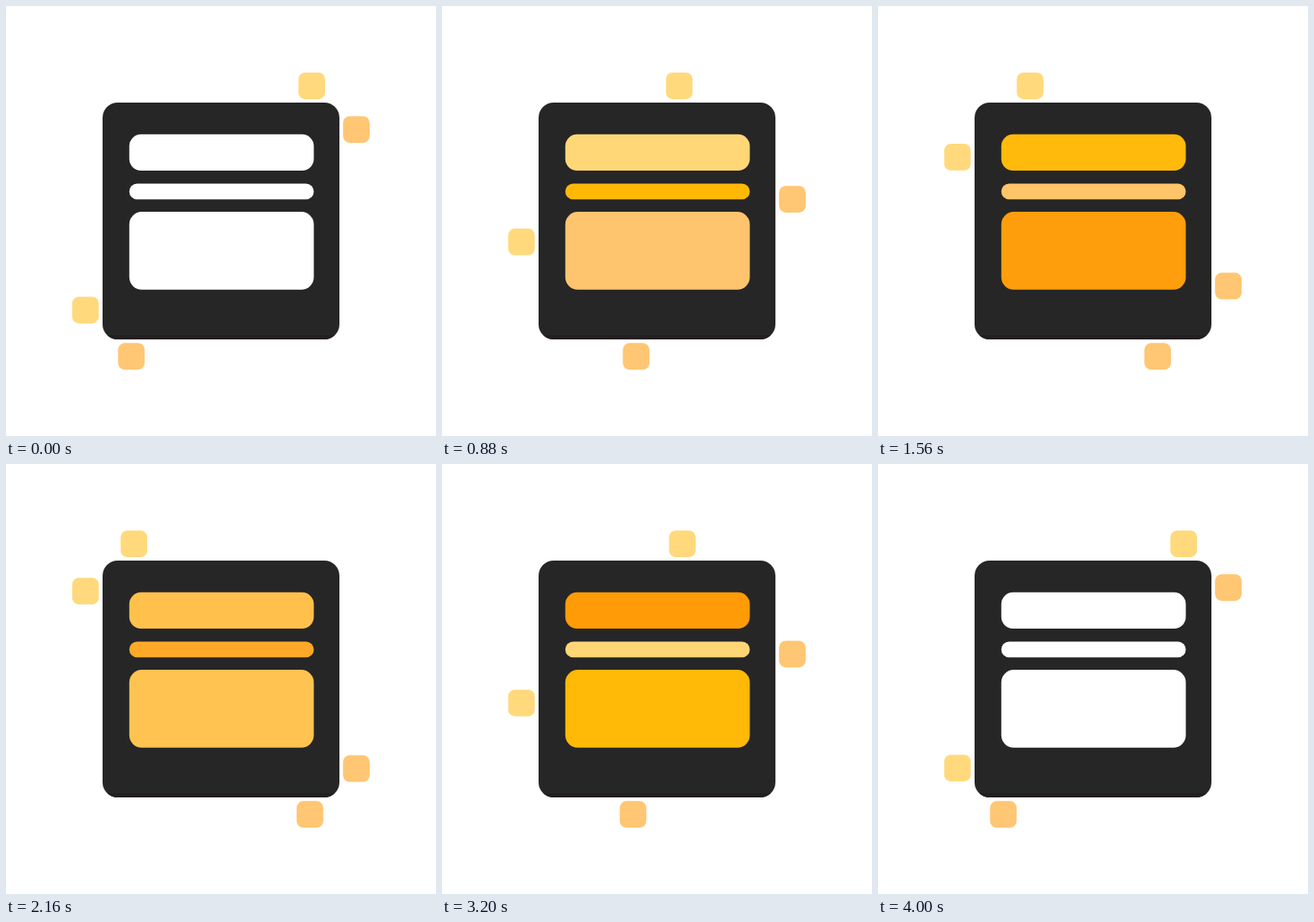
An HTML page that plays this animation: 512 by 512 pixels, repeating every 4.04 s.

```html
<!DOCTYPE html>
<html lang="en">
<head>
<meta charset="utf-8">
<title>Card loader</title>
<style>
  html, body { margin: 0; width: 100%; height: 100%; overflow: hidden; background: #fff; }
  svg { display: block; width: 100%; height: 100%; }
  .yellow { fill: #ffd97c; }
  .peach { fill: #ffc674; }
</style>
</head>
<body>
<svg viewBox="0 0 512 512">
  <clipPath id="card"><rect x="115" y="115" width="282" height="282" rx="18"/></clipPath>
  <g clip-path="url(#card)">
    <rect x="115" y="115" width="282" height="282" fill="#262627"/>
    <rect x="115" y="392" width="282" height="5" fill="#231f20"/>
  </g>

  <g fill="#fff">
    <rect id="header" x="146.8" y="152.8" width="219.7" height="43.2" rx="14"/>
    <rect id="line" x="146.8" y="211.5" width="219.7" height="18.7" rx="9.3"/>
    <rect id="body" x="146.8" y="245" width="219.7" height="92.8" rx="15"/>
  </g>

  <rect id="top" class="yellow" x="348.2" y="79.2" width="31.7" height="31.7" rx="8"/>
  <rect id="left" class="yellow" x="78.8" y="346.2" width="31.7" height="31.7" rx="8"/>
  <rect id="right" class="peach" x="401.3" y="131.2" width="31.7" height="31.7" rx="8"/>
  <rect id="bottom" class="peach" x="133.4" y="401.3" width="31.7" height="31.7" rx="8"/>
</svg>
<script>
const LOOP = 4040, STEP = 40, TURN = 50, LAST = 99, COLOR_SPAN = 20;

const white = [255, 255, 255];
const yellow = [255, 217, 124];
const amber = [255, 183, 0];
const peach = [255, 198, 116];
const orange = [255, 153, 0];

const bars = {
  header: [white, yellow, amber, peach, orange, white],
  line: [white, amber, peach, orange, yellow, white],
  body: [white, peach, orange, yellow, amber, white]
};

// Travel of each tile along its side of the card: [dx, dy]
const tiles = {
  top: [-214, 0],
  left: [0, -213],
  right: [0, 218],
  bottom: [215, 0]
};

const byId = id => document.getElementById(id);
const smooth = s => s * s * (3 - 2 * s);

function colorAt(stops, step) {
  const i = Math.min(Math.floor(step / COLOR_SPAN), stops.length - 2);
  const start = i * COLOR_SPAN;
  const end = Math.min(start + COLOR_SPAN, LAST);
  const mix = (step - start) / (end - start);
  const rgb = stops[i].map((c, k) => Math.round(c + (stops[i + 1][k] - c) * mix));
  return `rgb(${rgb})`;
}

function draw(time) {
  // Advances 25 times a second; the opening pose is held for two steps.
  const step = Math.max(0, Math.floor(((time + 1) % LOOP) / STEP) - 1);
  const travel = smooth(step <= TURN ? step / TURN : (LAST - step) / (LAST - TURN));

  for (const [id, stops] of Object.entries(bars)) {
    byId(id).setAttribute("fill", colorAt(stops, step));
  }
  for (const [id, [dx, dy]] of Object.entries(tiles)) {
    byId(id).setAttribute("transform", `translate(${dx * travel} ${dy * travel})`);
  }
  requestAnimationFrame(draw);
}

draw(0);
</script>
</body>
</html>
```
